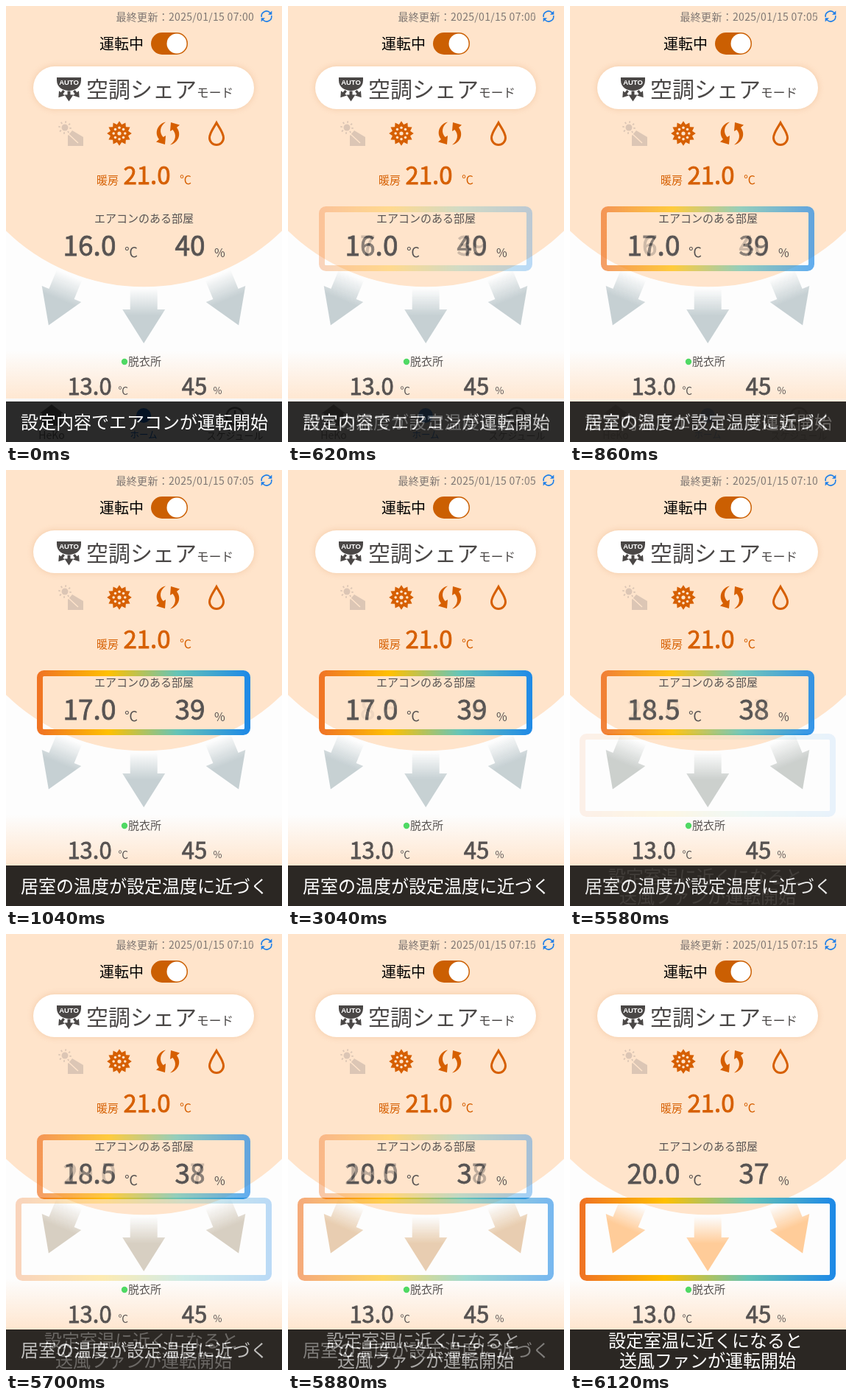
An HTML page for the animation above (8000 ms loop, 375 by 592 pixels).

```html
<!DOCTYPE html>
<html lang="ja">
<head>
<meta charset="utf-8">
<title>空調シェア</title>
<style>
html, body { margin: 0; width: 100%; height: 100%; overflow: hidden; background: #fdfdfd; }
#stage { position: absolute; left: 0; top: 0; width: 375px; height: 592px; overflow: hidden; }
svg { position: absolute; left: 0; top: 0; display: block; }
text { font-family: "Noto Sans CJK JP", "Noto Sans", sans-serif; font-weight: 400; white-space: pre; }
.num { text-anchor: middle; stroke-width: .8px; stroke: currentColor; fill: currentColor; }
.grey { color: #575352; fill: #575352; }
.warm { color: #d65f00; fill: #d65f00; }
.mid { text-anchor: middle; }

/* Stacked states add up, so each change is a true cross-fade. */
#states { position: absolute; inset: 0; isolation: isolate; }
#states svg { opacity: 0; mix-blend-mode: plus-lighter; animation: 8s steps(10, start) infinite; }
#states svg:nth-child(1) { animation-name: start; }
#states svg:nth-child(2) { animation-name: warming; }
#states svg:nth-child(3) { animation-name: warmer; }
#states svg:nth-child(4) { animation-name: fan; }
@keyframes start   { 0%, 6.25% { opacity: 1 } 13.75%, 100% { opacity: 0 } }
@keyframes warming { 0%, 6.25% { opacity: 0 } 13.75%, 38% { opacity: 1 } 45.5%, 100% { opacity: 0 } }
@keyframes warmer  { 0%, 38% { opacity: 0 } 45.5%, 69.75% { opacity: 1 } 77.25%, 100% { opacity: 0 } }
@keyframes fan     { 0%, 69.75% { opacity: 0 } 77.25%, 100% { opacity: 1 } }
</style>
</head>
<body>
<div id="stage">
<svg width="375" height="592" viewBox="0 0 375 592">
  <defs>
    <linearGradient id="floor" x1="0" y1="0" x2="0" y2="1">
      <stop offset="0" stop-color="#fdfdfd"/><stop offset="1" stop-color="#ffe5cd"/>
    </linearGradient>
    <linearGradient id="cool" gradientUnits="userSpaceOnUse" x1="0" y1="-28" x2="0" y2="8">
      <stop offset="0" stop-color="#c6d0d3" stop-opacity="0"/><stop offset="1" stop-color="#c6d0d3"/>
    </linearGradient>
    <linearGradient id="heat" gradientUnits="userSpaceOnUse" x1="0" y1="-28" x2="0" y2="8">
      <stop offset="0" stop-color="#ffcc99" stop-opacity="0"/><stop offset="1" stop-color="#ffcc99"/>
    </linearGradient>
    <linearGradient id="rainbow">
      <stop offset="0" stop-color="#f07423"/><stop offset=".33" stop-color="#ffc000"/>
      <stop offset=".66" stop-color="#66c4b6"/><stop offset="1" stop-color="#1f8ae6"/>
    </linearGradient>
    <path id="arrow" d="M-18.5-30h37V0H29L0 46-29 0h10.500z"/>
    <path id="vent" d="M-2-6h4v5h4L0 8-6-1h4z"/>
    <path id="crescent" d="M-3-15.500C-14-13-19-1-12 8l-4 3.500 12 3.500 1-12-3.500 2C-12-1-11-10-3-15.500z"/>
    <g id="half"><path d="M-6.700 1A6.700 6.700 0 0 1 5-4.600" fill="none" stroke="#1f7fe8" stroke-width="1.6"/><path d="M7.300-7.500v5.300H2z" fill="#1f7fe8"/></g>
  </defs>

  <rect width="375" height="592" fill="#fdfdfd"/>
  <rect y="468" width="375" height="72" fill="url(#floor)"/>
  <rect y="540" width="375" height="52" fill="#ffe5cd"/>
  <circle cx="187.500" cy="112" r="269.300" fill="#ffe4cb"/>

  <g transform="translate(354 14)"><use href="#half"/><use href="#half" transform="rotate(180)"/></g>

  <text x="127" y="59" font-size="20">運転中</text>
  <rect x="197" y="36" width="50" height="30" rx="15" fill="#cb5f02"/>
  <circle cx="232" cy="51" r="13.500" fill="#fff"/>

  <rect x="37" y="82" width="300" height="58" rx="29" fill="#fff" style="filter:drop-shadow(0 0 4px rgba(226,165,115,.4))"/>
  <g fill="#4a4746">
    <path d="M69 97h33v4c0 9-8 14-16.500 14S69 110 69 101z"/>
    <use href="#vent" x="85.500" y="121.500"/>
    <use href="#vent" transform="translate(75.500 119) rotate(38) scale(.85)"/>
    <use href="#vent" transform="translate(95.500 119) rotate(-38) scale(.85)"/>
    <text x="109" y="123.500" font-size="30">空調シェア</text>
    <text x="259" y="123.500" font-size="16.700">モード</text>
  </g>
  <text class="mid" x="85.500" y="107" fill="#fff" style="font:700 9.500px 'Liberation Sans',sans-serif">AUTO</text>

  <g fill="#dcc6b5">
    <circle cx="80" cy="165" r="4.500"/>
    <circle cx="80" cy="165" r="7.500" fill="none" stroke="#dcc6b5" stroke-width="2.600" stroke-dasharray="1.800 4.090"/>
    <path d="M84 176l6-7 15 9v12H84z"/>
    <path d="M85 174l13 12" stroke="#ffe4cb" stroke-width="1.500"/>
  </g>
  <g id="flower" class="warm" transform="translate(154 173)"></g>
  <g class="warm" transform="translate(220 173)"><use href="#crescent"/><use href="#crescent" transform="rotate(180)"/></g>
  <path d="M286 158.500C282 166 276.500 172 276.500 179a9.500 9.500 0 0 0 19 0C295.500 172 290 166 286 158.500z" fill="none" stroke="#d65f00" stroke-width="3"/>

  <g class="warm">
    <text x="123" y="242" font-size="15">暖房</text>
    <text class="num" x="191.500" y="242" font-size="33">21.0</text>
    <text x="236" y="242" font-size="16">℃</text>
  </g>
  <g class="grey">
    <text class="mid" x="187.500" y="294" font-size="15">エアコンのある部屋</text>
    <text x="161" y="341" font-size="18">℃</text>
    <text x="283" y="341" font-size="16">%</text>
    <text x="166" y="488" font-size="15">脱衣所</text>
    <text class="num" x="113.500" y="527.500" font-size="31">13.0</text>
    <text x="152.500" y="527" font-size="13.500">℃</text>
    <text class="num" x="256" y="527.500" font-size="31">45</text>
    <text x="281.500" y="527" font-size="13">%</text>
  </g>
  <circle cx="161" cy="483" r="4.200" fill="#4fd964"/>
</svg>
<div id="states"></div>
</div>

<script>
const ring = (n, draw) => Array.from({ length: n }, (_, i) => draw(2 * Math.PI * i / n, i));
const at = (r, a) => [r * Math.sin(a), -r * Math.cos(a)].map(v => v.toFixed(2));

const dot = (r, size) => a => {
  const [x, y] = at(r, a);
  return `<circle cx="${x}" cy="${y}" r="${size}" fill="#ffe4cb"/>`;
};
document.getElementById('flower').innerHTML =
  `<polygon points="${ring(24, (a, i) => at(i % 2 ? 12.5 : 16.8, a)).join(' ')}"/>` +
  dot(0, 2.6)(0) + ring(8, dot(7.8, 1.8)).join('');

const frame = (x, y, w, h) =>
  `<rect x="${x + 4}" y="${y + 4}" width="${w - 8}" height="${h - 8}" rx="5.5" fill="none" stroke="url(#rainbow)" stroke-width="8"/>`;
const roomFrame = frame(42, 272, 290, 88);
const ductFrame = frame(13, 358, 348, 113);

const arrows = paint => [[75.5, 391, 22.5], [187.2, 412, 0], [298.5, 391, -22.5]].map(([x, y, turn]) =>
  `<use href="#arrow" fill="url(#${paint})" transform="translate(${x} ${y}) rotate(${turn})"/>`).join('');

const tabs = `
  <rect y="533" width="375" height="59" fill="#fafafa"/>
  <g fill="#777" class="mid">
    <path d="M62 541l16 12h-3v17H49v-17h-3z"/>
    <text x="62" y="588" font-size="14">HeKo</text>
    <circle cx="311" cy="557" r="11.5" fill="none" stroke="#777" stroke-width="2.5"/>
    <path d="M311 549v9h6" fill="none" stroke="#777" stroke-width="2.5"/>
    <text x="311" y="588" font-size="13">スケジュール</text>
  </g>
  <circle cx="187" cy="556" r="10" fill="#1670d8"/>
  <text class="mid" x="187" y="587" font-size="12.5" fill="#1670d8">ホーム</text>`;

const near = ['居室の温度が設定温度に近づく'];
const states = [
  { min: '00', temp: '16.0', hum: 40, paint: 'cool', extra: tabs, lines: ['設定内容でエアコンが運転開始'] },
  { min: '05', temp: '17.0', hum: 39, paint: 'cool', extra: roomFrame, lines: near },
  { min: '10', temp: '18.5', hum: 38, paint: 'cool', extra: roomFrame, lines: near },
  { min: '15', temp: '20.0', hum: 37, paint: 'heat', extra: ductFrame, lines: ['設定室温に近くになると', '送風ファンが運転開始'] },
];

const caption = lines => lines.map((line, i) => {
  const [x, y] = lines.length > 1 ? [[52, 561], [67, 587.5]][i] : [20, 574];
  return `<text x="${x}" y="${y}" font-size="24" fill="#fff">${line}</text>`;
}).join('');

document.getElementById('states').innerHTML = states.map(s => `
  <svg width="375" height="592" viewBox="0 0 375 592">
    <text x="149.5" y="20" font-size="14" letter-spacing=".3" fill="#7d7672">最終更新：2025/01/15 07:${s.min}</text>
    ${arrows(s.paint)}
    <g class="grey">
      <text class="num" x="113.5" y="339" font-size="37">${s.temp}</text>
      <text class="num" x="250" y="339" font-size="37">${s.hum}</text>
    </g>
    ${s.extra}
    <rect y="537" width="375" height="55" fill="#000" fill-opacity=".83"/>
    ${caption(s.lines)}
  </svg>`).join('');
</script>
</body>
</html>
```
